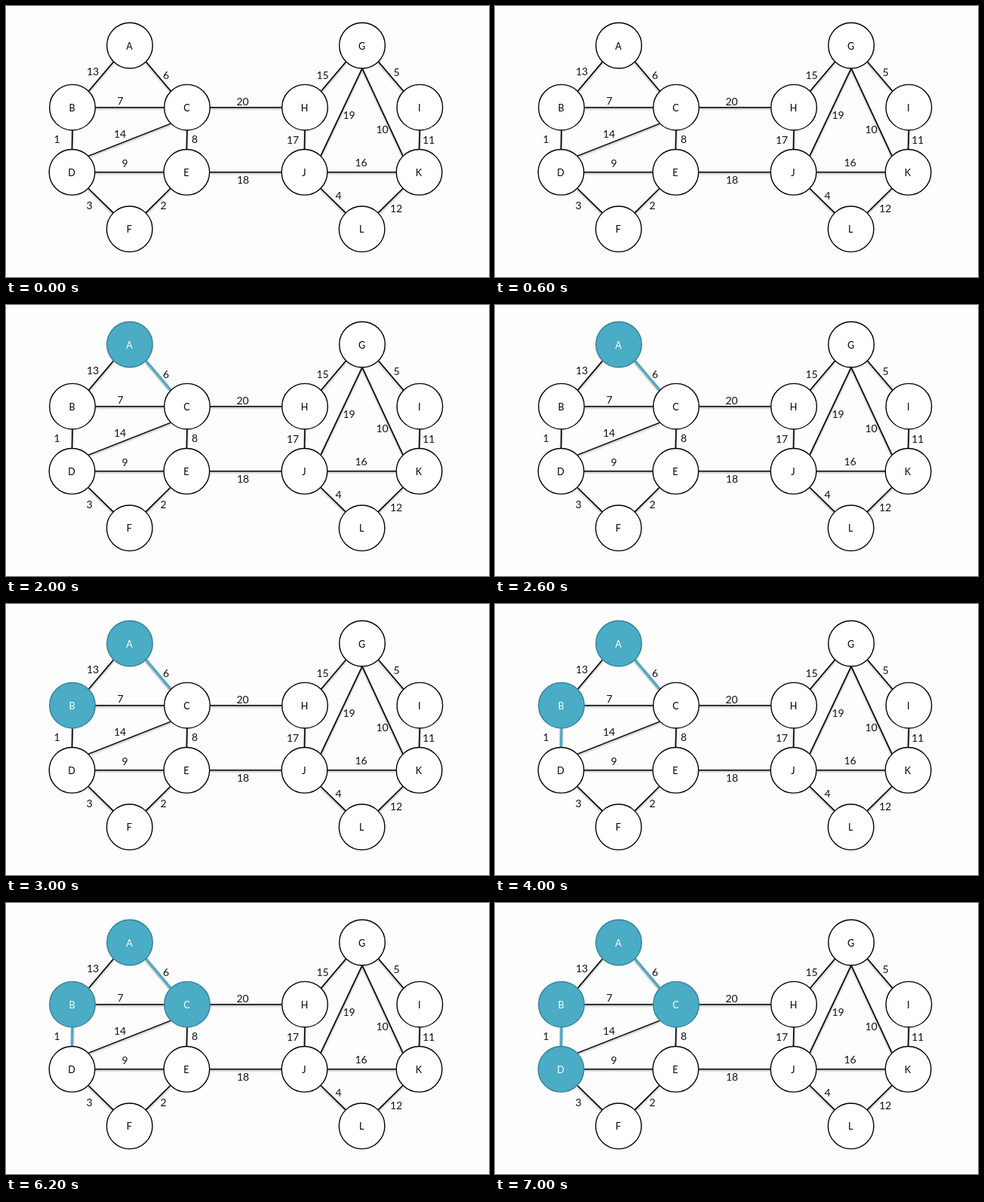
An HTML page with a canvas for the animation above (8 s loop, 640 by 360 pixels).

```html
<!DOCTYPE html>
<html lang="en">
<head>
<meta charset="utf-8">
<title>Weighted graph</title>
<style>
  html, body { margin: 0; width: 100%; height: 100%; overflow: hidden; background: #fdfdfd; }
  canvas { display: block; width: 640px; height: 360px; }
</style>
</head>
<body>
<canvas id="stage" width="640" height="360"></canvas>
<script>
const ctx = document.getElementById('stage').getContext('2d');
const LOOP = 8000, R = 30.3;
const BLUE = '#4aacc5', RIM = '#37809a', INK = '#000';

const nodes = {
  A: [164, 52.5], B: [88, 134.7], C: [240, 134.7], D: [87.5, 220.8],
  E: [239.4, 220.8], F: [163.7, 296.3], G: [472, 52.5], H: [396, 134.7],
  I: [548.3, 134.7], J: [395.5, 220.8], K: [547.5, 220.8], L: [471.6, 296.3]
};

// ends, weight, label centre
const edges = [
  ['AB', 13, 115, 87], ['AC', 6, 212, 91.5], ['BC', 7, 151.5, 126],
  ['CD', 14, 151, 169.5], ['BD', 1, 67.5, 177], ['CE', 8, 250, 177],
  ['DE', 9, 157.5, 209], ['DF', 3, 110.5, 264.5], ['EF', 2, 208.5, 264.5],
  ['CH', 20, 313.5, 126.5], ['EJ', 18, 314, 231], ['GH', 15, 419.5, 91.5],
  ['GI', 5, 517.5, 87.5], ['HJ', 17, 380, 177.5], ['IK', 11, 560, 177.5],
  ['GJ', 19, 454.5, 144.5], ['GK', 10, 498.5, 163.5], ['JK', 16, 470.5, 208],
  ['JL', 4, 440.5, 252], ['KL', 12, 517, 268.5]
];

// moment at which each node or edge is highlighted
const litAt = { A: 1000, AC: 2000, B: 3000, BD: 4000, C: 5000, D: 7000 };

// Connectors attach to the nearest of eight points on each rim.
function anchor(from, to, id) {
  let angle = Math.atan2(to[1] - from[1], to[0] - from[0]);
  if (id === 'GJ' || id === 'GK') {
    angle = from === nodes.G ? Math.PI / 2 : (id === 'GJ' ? -1 : -3) * Math.PI / 4;
  } else if (id === 'CD') {
    angle = (from === nodes.C ? 3 : -1) * Math.PI / 4;
  } else {
    angle = Math.round(angle / (Math.PI / 4)) * Math.PI / 4;
  }
  return [from[0] + R * Math.cos(angle), from[1] + R * Math.sin(angle)];
}

function drawEdge(id, lit) {
  const p = nodes[id[0]], q = nodes[id[1]];
  const a = anchor(p, q, id), b = anchor(q, p, id);
  ctx.save();
  ctx.shadowColor = 'rgba(0,0,0,.4)';
  ctx.shadowBlur = 2.5;
  ctx.shadowOffsetY = 1.5;
  ctx.strokeStyle = lit ? BLUE : INK;
  ctx.lineWidth = lit ? 3.2 : 1.6;
  ctx.beginPath();
  ctx.moveTo(...a);
  ctx.lineTo(...b);
  ctx.stroke();
  ctx.restore();
}

function drawText(text, x, y, size, color) {
  ctx.font = size + 'px Lato, "Open Sans", sans-serif';
  ctx.fillStyle = color;
  ctx.fillText(text, x, y + size * 0.36);
}

function drawNode(name, lit) {
  const [x, y] = nodes[name];
  ctx.beginPath();
  ctx.arc(x, y, R, 0, Math.PI * 2);
  ctx.fillStyle = lit ? BLUE : '#fff';
  ctx.fill();
  ctx.strokeStyle = lit ? RIM : INK;
  ctx.lineWidth = 1.4;
  ctx.stroke();
  drawText(name, x - 0.5, y + 0.5, 12.5, lit ? '#fff' : INK);
}

function draw(now) {
  const t = now % LOOP;
  const isLit = id => t >= litAt[id];
  ctx.fillStyle = '#fdfdfd';
  ctx.fillRect(0, 0, 640, 360);
  ctx.textAlign = 'center';
  ctx.textBaseline = 'alphabetic';
  for (const [id] of edges) drawEdge(id, isLit(id));
  for (const name in nodes) drawNode(name, isLit(name));
  for (const [, weight, x, y] of edges) drawText(weight, x, y, 14, '#111');
  requestAnimationFrame(tick);
}

let start;
function tick(now) {
  if (start === undefined) start = now;
  draw(now - start);
}
requestAnimationFrame(tick);
</script>
</body>
</html>
```
